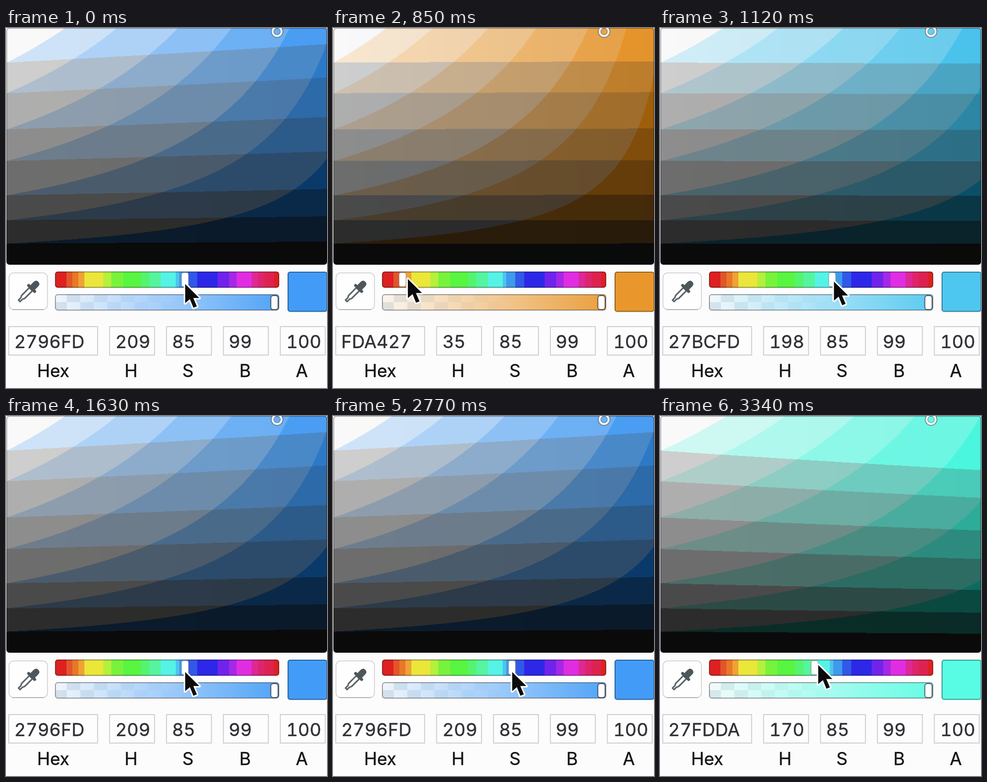
Write an HTML page with a canvas that moves like this. It is 643 px wide and 721 px high and loops after 3.42 s.

```html
<!DOCTYPE html>
<html lang="en">
<head>
<meta charset="utf-8">
<title>Colour picker</title>
<style>
  html, body { margin: 0; width: 100%; height: 100%; overflow: hidden; background: #fcfcfd; }
  canvas, svg { position: absolute; left: 0; top: 0; display: block; }
  canvas { left: 1px; border-radius: 4px 4px 6px 6px; }
  text { font-family: Inter, "Open Sans", sans-serif; stroke-width: .4; }
  .value { font-size: 36px; fill: #2f2f34; stroke: #2f2f34; font-variant-numeric: tabular-nums; }
  .label { font-size: 35px; fill: #131316; stroke: #131316; text-anchor: middle; }
  .field { fill: #fdfdfe; stroke: #c6c6cb; stroke-width: 1.6; }
  .edge { fill: none; stroke: #000; stroke-opacity: .36; stroke-width: 2; }
</style>
</head>
<body>
<canvas id="pad" width="642" height="474"></canvas>
<svg width="643" height="721" viewBox="0 0 643 721">
  <defs>
    <linearGradient id="fade">
      <stop class="tint" offset="0" stop-opacity=".06"/>
      <stop class="tint" offset="1" stop-opacity=".92"/>
    </linearGradient>
    <linearGradient id="checkFade">
      <stop offset="0" stop-color="#fff"/>
      <stop offset=".6" stop-color="#000"/>
    </linearGradient>
    <pattern id="check" x="95" y="533" width="54" height="32" patternUnits="userSpaceOnUse">
      <path d="M27 0h27v16h-27zM0 16h27v16h-27z" fill="#dfe5ea"/>
    </pattern>
    <mask id="checkMask"><rect x="99" y="533" width="448" height="32" fill="url(#checkFade)"/></mask>
    <clipPath id="hueClip"><rect x="98.5" y="488" width="448.5" height="32" rx="5"/></clipPath>
  </defs>

  <rect class="edge" x="1.5" y=".5" width="641" height="473" rx="5" style="stroke-width:1.4"/>
  <circle cx="543" cy="7" r="11.5" fill="none" stroke="#555f66" stroke-opacity=".75" stroke-width="2"/>
  <circle cx="543" cy="7" r="9" fill="none" stroke="#f6f7f7" stroke-width="4"/>
  <circle cx="543" cy="7" r="6.6" fill="none" stroke="#444f58" stroke-opacity=".5" stroke-width="1.2"/>

  <rect x="6" y="490.5" width="77" height="73.5" rx="9" fill="#fefefe" stroke="#c9c9cc" stroke-width="1.4"/>
  <path d="M13 564h63" stroke="#adadb0" stroke-width="1.5"/>
  <g transform="translate(45 528) rotate(45)">
    <path d="M-4.3-7V15L-2.2 19.5V26H2.2V19.5L4.3 15V-7Z" fill="#fff" stroke="#5a6266" stroke-width="3" stroke-linejoin="round"/>
    <rect x="-11.5" y="-12" width="23" height="6" rx="3" fill="#4d565b"/>
    <path d="M-6.5-11V-21Q-6.5-28 0-28T6.5-21V-11Z" fill="#4d565b"/>
  </g>

  <g id="hues" clip-path="url(#hueClip)"></g>
  <rect class="edge" x="99" y="488.5" width="447.5" height="31" rx="5"/>
  <rect id="hueKnob" y="490" width="14" height="28" rx="4" fill="#fff" stroke="#777" stroke-opacity=".55" stroke-width="1.5"/>

  <rect x="99" y="534" width="447.5" height="31" rx="5" fill="#fbfbfc"/>
  <rect x="99" y="534" width="447.5" height="31" rx="5" fill="url(#check)" mask="url(#checkMask)"/>
  <rect x="99" y="534" width="447.5" height="31" rx="5" fill="url(#fade)"/>
  <rect class="edge" x="99" y="534" width="447.5" height="31" rx="5"/>
  <rect x="530.5" y="536" width="14.5" height="28" rx="5" fill="#fff" stroke="#000" stroke-opacity=".55" stroke-width="2"/>

  <rect id="swatch" x="564" y="488" width="79.5" height="80.5" rx="5"/>
  <rect class="edge" x="565" y="489" width="78" height="78.5" rx="4"/>

  <g id="fields"></g>

  <path id="cursor" d="M1.8 3.5V39L10.5 31.5 17 47.5 23.5 44.8 16.8 29.5H28Z" fill="#0b0b0c" stroke="#fff" stroke-width="5.5" stroke-linejoin="round" paint-order="stroke"/>
</svg>
<script>
const LOOP = 3420;
const $ = id => document.getElementById(id);
const SVG = "http://www.w3.org/2000/svg";

function add(parent, tag, attrs, text = "") {
  const el = document.createElementNS(SVG, tag);
  for (const k in attrs) el.setAttribute(k, attrs[k]);
  el.textContent = text;
  parent.append(el);
  return el;
}

// Hue strip: left edge and colour of each segment
const strip = [
  [98, "#de2021"], [121, "#e2552a"], [133, "#e87828"], [145, "#efa235"], [157, "#ebe63a"],
  [195, "#b4f03c"], [211, "#78f33c"], [235, "#58f541"], [270, "#55f46e"], [287, "#55f4a0"],
  [310, "#55f3e6"], [340, "#50c3ee"], [347, "#3e9beb"], [365, "#3258e8"], [383, "#2d28e8"],
  [424, "#7024eb"], [447, "#a428e6"], [462, "#e02de2"], [492, "#de2896"], [505, "#de246e"],
  [518, "#de2250"], [537, "#de2021"], [548]
];
strip.slice(0, -1).forEach(([x, fill], i) =>
  add($("hues"), "rect", { x, y: 488, width: strip[i + 1][0] - x + .3, height: 32, fill }));

// Labelled boxes: x, width, text inset, label centre
const [hexText, hueText] = [
  [5.5, 178, 16.5, "Hex", 94.5, ""], [207.5, 90, 219, "H", 250.5, ""],
  [321.5, 90, 332.5, "S", 364.5, "85"], [435.5, 90, 446, "B", 479, "99"],
  [549.5, 90, 561.5, "A", 592.5, "100"]
].map(([x, width, tx, name, cx, value]) => {
  add($("fields"), "rect", { class: "field", x, y: 598, width, height: 57 });
  add($("fields"), "text", { class: "label", x: cx, y: 699 }, name);
  return add($("fields"), "text", { class: "value", x: tx, y: 641 }, value);
});

// Time, hue, pointer x, pointer y
const keys = [
  [0, 209, 357, 509], [680, 209, 357, 509], [850, 35, 148, 499], [940, 101.2, 240, 497],
  [1120, 198.2, 346.5, 504], [1330, 209, 357, 509], [2850, 209, 357, 509],
  [3100, 25.2, 132, 505], [3340, 170.2, 315, 495], [LOOP, 209, 357, 509]
];
// The picture refreshes only at these times
const ticks = [0, 730, 850, 940, 1000, 1120, 1210, 1330, 2920, 3010, 3100, 3180, 3260, 3340];

function slope(i, c) {
  if (i < 1 || i > keys.length - 2) return 0;
  const [a, b, d] = [keys[i - 1], keys[i], keys[i + 1]];
  if ((b[c] - a[c]) * (d[c] - b[c]) <= 0) return 0;
  return (d[c] - a[c]) / (d[0] - a[0]);
}

function pose(t, c) {
  const i = Math.max(0, keys.findIndex(k => k[0] > t) - 1);
  const a = keys[i], b = keys[i + 1], span = b[0] - a[0], u = (t - a[0]) / span;
  const v = 1 - u;
  return a[c] * (1 + 2 * u) * v * v + b[c] * u * u * (3 - 2 * u)
    + span * (slope(i, c) * u * v * v - slope(i + 1, c) * u * u * v);
}

function hexOf(h) {
  return [5, 3, 1].map(n => {
    const k = (n + h / 60) % 6;
    const f = Math.max(0, Math.min(k, 4 - k, 1));
    return Math.round(253 - 214 * f).toString(16).padStart(2, "0");
  }).join("").toUpperCase();
}

// Hues as they look on screen
const looks = [
  [0, 226, 34, 32], [25, 231, 119, 40], [60, 237, 230, 58], [101, 134, 247, 58],
  [120, 92, 246, 66], [170, 88, 252, 228], [198, 78, 200, 240], [209, 66, 156, 247], [240, 45, 40, 235]
];
function look(h) {
  const i = Math.max(1, looks.findIndex(s => s[0] >= h));
  const a = looks[i - 1], b = looks[i], u = (h - a[0]) / (b[0] - a[0]);
  return [1, 2, 3].map(c => a[c] + (b[c] - a[c]) * u);
}

// Flat tone bands
const bounds = [23, 48, 75, 112, 146, 185, 218];
const tones = [10, 44, 74, 109, 141, 174, 206, 249];
const band = Uint8Array.from({ length: 256 }, (_, v) => tones[bounds.filter(b => v >= b).length]);

const pad = $("pad").getContext("2d");
const W = 642, H = 474, image = pad.createImageData(W, H);

// Band the strongest and weakest channel, then mix so the hue holds
function drawPad(rgb) {
  const px = image.data;
  const hi = Math.max(...rgb), lo = Math.min(...rgb);
  const mix = rgb.map(c => (c - lo) / (hi - lo));
  const luma = (.3 * rgb[0] + .59 * rgb[1] + .11 * rgb[2]) / 255;
  const tilt = (luma - .65) * .8;
  for (let y = 0, p = 0; y < H; y++) {
    const light = 255 * (1 - y / H);
    for (let x = 0; x < W; x++, p += 4) {
      const s = x / W;
      const top = band[Math.min(255, light * (1 + tilt * s)) | 0];
      const low = Math.min(top, band[light * (1 - s * 1.08 * (1 - lo / 255)) | 0]);
      const full = top * (1 - s * (1 - hi / 255));
      for (let c = 0; c < 3; c++) px[p + c] = low + mix[c] * (full - low);
      px[p + 3] = 255;
    }
  }
  pad.putImageData(image, 0, 0);
}

function draw(t) {
  const hue = pose(t, 1), rgb = look(hue);
  const css = `rgb(${rgb.map(Math.round)})`;
  drawPad(rgb);
  $("swatch").setAttribute("fill", css);
  document.querySelectorAll(".tint").forEach(s => s.setAttribute("stop-color", css));
  $("hueKnob").setAttribute("x", 88.2 + 1.26 * hue);
  $("cursor").setAttribute("transform", `translate(${pose(t, 2)} ${pose(t, 3)}) scale(1.08)`);
  hexText.textContent = hexOf(hue);
  hueText.textContent = Math.round(hue);
}

let shown = -1;
const start = performance.now();
function frame() {
  const now = (performance.now() - start) % LOOP;
  const tick = ticks.filter(t => t <= now).pop();
  if (tick !== shown) draw(shown = tick);
  requestAnimationFrame(frame);
}
frame();
</script>
</body>
</html>
```
